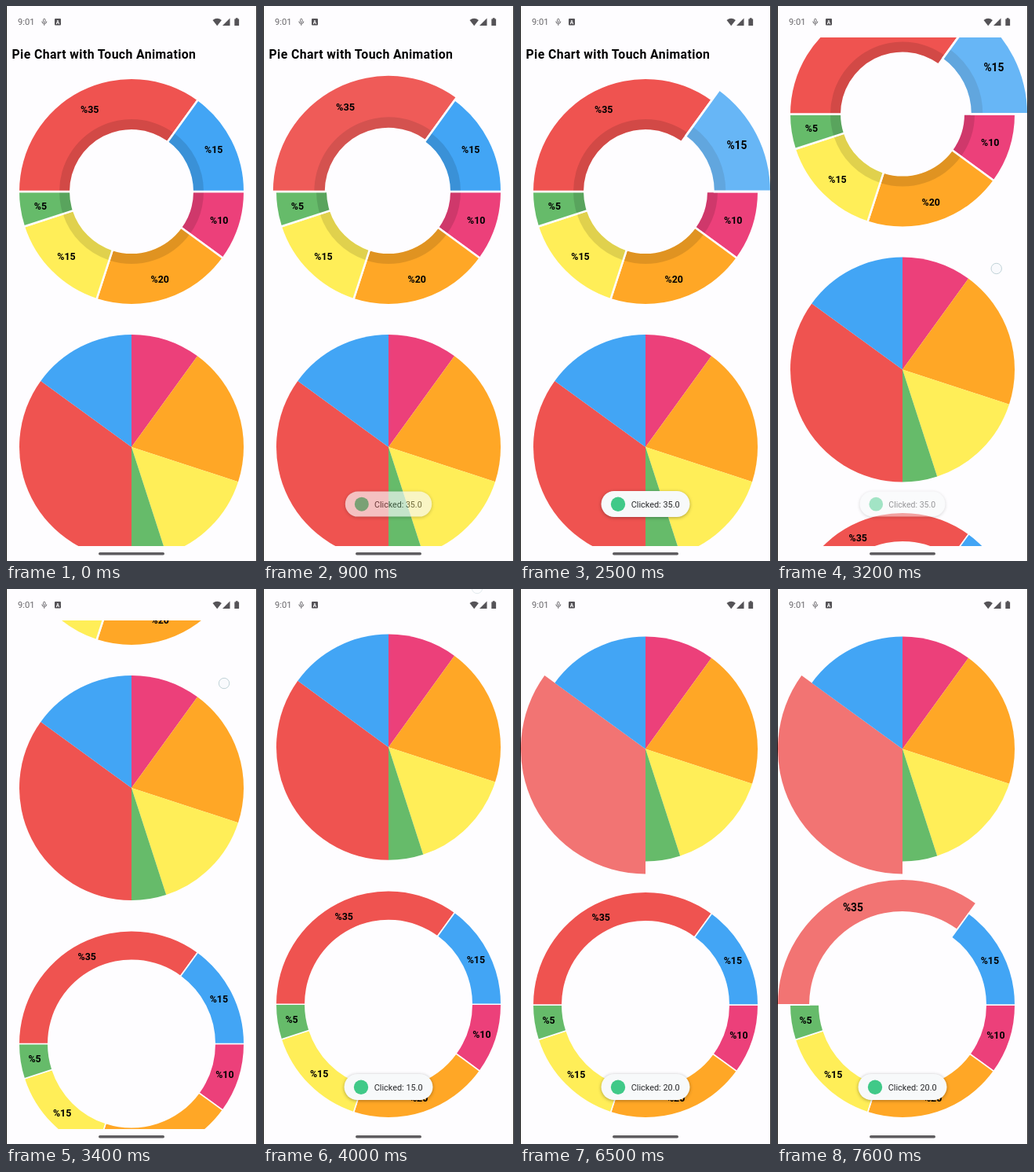
These frames come from a looping animation (320 by 706 pixels, 8000 ms). An HTML page:

```html
<!DOCTYPE html>
<html lang="en">
<head>
<meta charset="utf-8">
<title>Pie charts</title>
<style>
  html, body { margin: 0; width: 100%; height: 100%; overflow: hidden; background: #fefdff; }
  svg { display: block; width: 100vw; height: 100vh; }
  text { font-family: Roboto, "Noto Sans", sans-serif; }
  .title { font-size: 15.8px; font-weight: 700; letter-spacing: .39px; }
  .label { font-size: 12.4px; font-weight: 700; text-anchor: middle; }
  .clock { font-size: 11.2px; fill: #68666a; }
  #toast text { font-size: 10.9px; fill: #28292b; }
  #toast rect { filter: drop-shadow(0 1px 2px rgba(0, 0, 0, .32)); }
</style>
</head>
<body>
<svg id="stage" viewBox="0 0 320 706" xmlns="http://www.w3.org/2000/svg">
  <clipPath id="view"><rect y="40" width="320" height="647"/></clipPath>
  <rect width="320" height="706" fill="#fefdff"/>

  <g clip-path="url(#view)">
    <g id="page"><text class="title" x="7.5" y="67">Pie Chart with Touch Animation</text></g>
  </g>

  <g id="status">
    <text class="clock" x="15" y="24.3">9:01</text>
    <g fill="none" stroke="#68666a">
      <rect x="47.6" y="16.3" width="2.4" height="4.6" rx="1.2"/>
      <path d="M45.8 19.5a3 3 0 0 0 6 0M48.8 22.5v2.3"/>
    </g>
    <rect x="62" y="16" width="8" height="8.5" rx="1" fill="#555357"/>
    <text x="66" y="22.7" font-size="6.5" font-weight="700" fill="#fff" text-anchor="middle">A</text>
    <g fill="#555357">
      <path d="M263.5 18q5.7-4.6 11.4 0l-5.7 7.2z"/>
      <path d="M285.5 15.5v9.5h-9.5z"/>
      <path d="M291.3 16.5h1.5v-1.3h2.8v1.3h1.5v8.6h-5.8z"/>
    </g>
  </g>

  <rect x="118" y="695" width="84" height="3.4" rx="1.7" fill="#5f5d60"/>

  <g id="toast">
    <rect x="103.5" y="617" width="113" height="33" rx="16.5" fill="#f7f9fa"/>
    <circle cx="125" cy="633.7" r="9.2" fill="#40c988"/>
    <text x="141.7" y="637.7"></text>
  </g>

  <circle id="touch" r="6.7" fill="#f4f8fa" fill-opacity=".68" stroke="#a9c2c8" stroke-width=".8"/>

  <path d="M.5 0v706M319.6 0v706" stroke="#111" stroke-width="1"/>
</svg>
<script>
const LOOP = 8000, STEP = 100, GROW = 0.112;
const RED = '#ef5350', BLUE = '#42a5f5', PINK = '#ec407a',
      ORANGE = '#ffa726', YELLOW = '#ffee58', GREEN = '#66bb6a';
const data = [[PINK, 10], [ORANGE, 20], [YELLOW, 15], [GREEN, 5], [RED, 35], [BLUE, 15]];

const byId = id => document.getElementById(id);
const page = byId('page'), toast = byId('toast'), touch = byId('touch');
const toastText = toast.querySelector('text');

function add(parent, tag, attrs) {
  const el = document.createElementNS('http://www.w3.org/2000/svg', tag);
  for (const key in attrs) el.setAttribute(key, attrs[key]);
  parent.appendChild(el);
  return el;
}

function polar(r, deg) {
  const a = deg * Math.PI / 180;
  return (r * Math.cos(a)).toFixed(2) + ' ' + (r * Math.sin(a)).toFixed(2);
}

function ring(inner, outer, a, b) {
  const back = inner ? `L${polar(inner, b)}A${inner} ${inner} 0 0 0 ${polar(inner, a)}` : 'L0 0';
  return `M${polar(outer, a)}A${outer} ${outer} 0 0 1 ${polar(outer, b)}${back}Z`;
}

// Returns the slices by colour, each with its group and its painted part.
function chart({ y, start, inner, shade = inner, gap }) {
  const root = add(page, 'g', { transform: `translate(160 ${y})` });
  const slices = {};
  let a = start;
  for (const [color, value] of data) {
    const b = a + value * 3.6;
    const group = add(root, 'g', {});
    const paint = add(group, 'g', {});
    add(paint, 'path', { d: ring(shade, 143, a, b), fill: color });
    if (shade < inner) add(paint, 'path', { d: ring(shade, inner, a, b), fill: '#000', opacity: 0.12 });
    if (gap) {
      for (const edge of [a, b]) {
        add(group, 'path', {
          d: `M${polar(shade - 1, edge)}L${polar(144, edge)}`, stroke: '#fefdff', 'stroke-width': gap
        });
      }
      const [x, ly] = polar((143 + inner) / 2, (a + b) / 2).split(' ');
      add(group, 'text', { class: 'label', x, y: +ly + 4.4 }).textContent = '%' + value;
    }
    slices[color] = { group, paint };
    a = b;
  }
  return slices;
}

const top1 = chart({ y: 236, start: 0, inner: 92, shade: 79, gap: 2.5 });
const pie = chart({ y: 561, start: -90, inner: 0 });
const thin = chart({ y: 886.5, start: 0, inner: 107, gap: 1.6 });

// Slice, time it opens, time it closes again.
const moves = [
  [top1[RED], 700, 1900],
  [top1[BLUE], 1900],
  [pie[ORANGE], 4700, 5900],
  [pie[RED], 5900],
  [thin[RED], 7000]
];
const taps = [[600, 112, 160], [1800, 266, 193], [4600, 236, 188], [5800, 92, 222], [6900, 96, 436]];
const toasts = [
  ['35.0', [[700, 0], [1000, 1], [3100, 1], [3200, 0.48], [3400, 0]]],
  ['15.0', [[3450, 0], [3700, 1], [5650, 1], [5900, 0]]],
  ['20.0', [[6000, 0], [6300, 1]]]
];
const scroll = [[3050, 0], [3100, 30], [3200, 98.5], [3300, 215], [3400, 308], [3500, 357.5]];
const stretch = [[3500, 0], [3800, 0.01], [4000, 0.0048], [4200, 0]];
const dragX = [[3050, 281], [4000, 273]];
const dragY = [[3050, 487], [3100, 440], [3200, 334], [3300, 215], [3400, 120], [3500, 62], [3700, 16], [4000, -1]];

function track(keys, t) {
  if (t <= keys[0][0]) return keys[0][1];
  for (let i = 1; i < keys.length; i++) {
    const [t0, v0] = keys[i - 1], [t1, v1] = keys[i];
    if (t < t1) return v0 + (v1 - v0) * (t - t0) / (t1 - t0);
  }
  return keys[keys.length - 1][1];
}

function ease(t, from) {
  const p = Math.min(1, Math.max(0, (t - from) / 600));
  return p * p * (3 - 2 * p);
}

function showTouch(x, y, alpha) {
  touch.setAttribute('cx', x);
  touch.setAttribute('cy', y);
  touch.setAttribute('opacity', alpha);
}

function draw(t) {
  for (const [slice, open, close = Infinity] of moves) {
    const k = ease(t, open) - (close < LOOP ? ease(t, close) : 0);
    slice.group.setAttribute('transform', `scale(${1 + GROW * k})`);
    slice.paint.setAttribute('opacity', 1 - 0.2 * k);
  }

  page.setAttribute('transform',
    `translate(0 687) scale(1 ${1 + track(stretch, t)}) translate(0 ${-687 - track(scroll, t)})`);

  let shown = 0;
  for (const [value, keys] of toasts) {
    const a = track(keys, t);
    if (a > 0) {
      shown = a;
      toastText.textContent = 'Clicked: ' + value;
    }
  }
  toast.setAttribute('opacity', shown);
  toast.setAttribute('transform',
    `translate(160 633.5) scale(${0.93 + 0.07 * shown}) translate(-160 -633.5)`);

  const tap = taps.find(([at]) => t >= at && t < at + 200);
  if (tap) showTouch(tap[1], tap[2], 1);
  else if (t >= 2900 && t < 4100) showTouch(track(dragX, t), track(dragY, t), t < 4000 ? 0.9 : 0.4);
  else showTouch(0, 0, 0);
}

const begin = performance.now();
function frame() {
  const t = (performance.now() - begin) % LOOP;
  draw(Math.floor(t / STEP) * STEP);
  requestAnimationFrame(frame);
}
draw(0);
requestAnimationFrame(frame);
</script>
</body>
</html>
```
